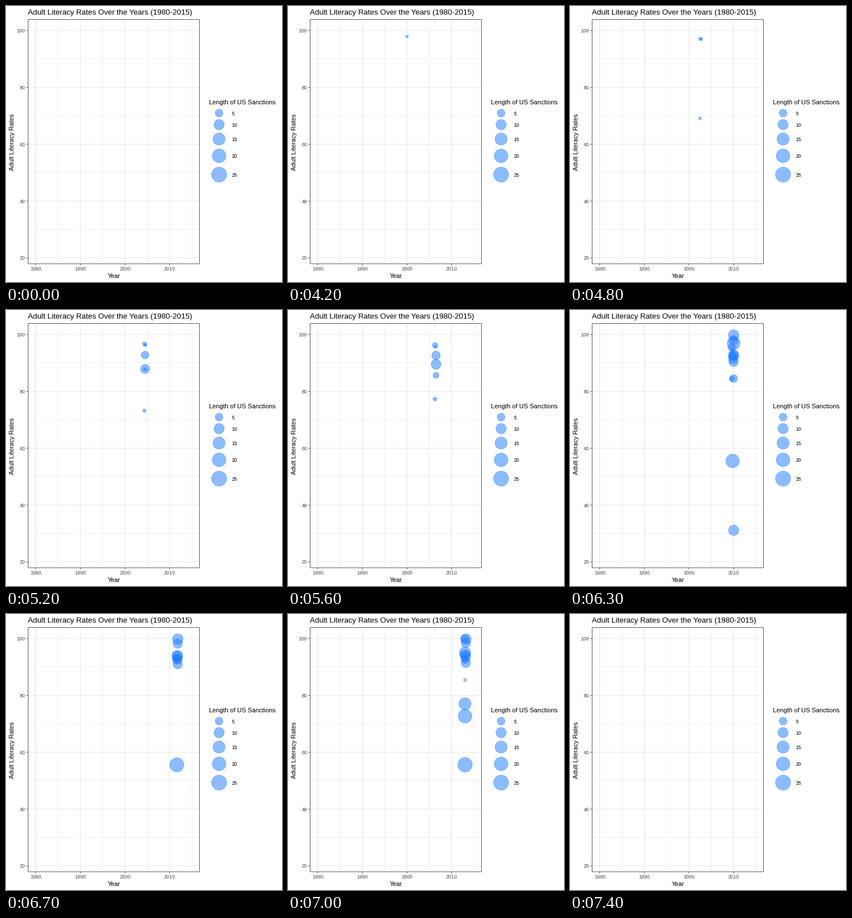
A matplotlib script for the animation above (7.5 s loop, 480x480 px).

```python
import numpy as np
import matplotlib.pyplot as plt
from matplotlib.animation import FuncAnimation
from matplotlib.patches import Circle, Rectangle

SIZE, DPI = 480, 72
FRAMES, INTERVAL = 75, 100
FIRST_YEAR, LAST_YEAR = 1980, 2015
BLUE = (0.106, 0.478, 1.0, 0.5)
GRID, DARK, LABEL = "#e6e6e6", "#333333", "#4d4d4d"

# Each bubble: (year, literacy rate, sanction length) at its known years.
TRACKS = [
    [(2000, 97.9, 1), (2011, 94.1, 1)],
    [(2002, 68.1, 1), (2011, 87.5, 2)],
    [(2002, 97.2, 1), (2011, 95.1, 6)],
    [(2004, 92.8, 4.5), (2010, 92.5, 10), (2013, 95, 13)],
    [(2004, 87.5, 7), (2008, 90.7, 10.5)],
    [(2004, 88.3, 1), (2008, 84, 5), (2010, 84.5, 5)],
    [(2005, 23.6, 7), (2006, 25, 8)],
    [(2007, 55.5, 17), (2013, 55.6, 23)],
    [(2008, 97.8, 17.5), (2010, 96.9, 17.5)],
    [(2007, 98, 4), (2010, 98, 8), (2015, 98.6, 8)],
    [(2008, 93.4, 13), (2010, 92.9, 9), (2013, 94.3, 9)],
    [(2008, 90.2, 7), (2015, 94.8, 11)],
    [(2007, 92.8, 4), (2013, 92.6, 5)],
    [(2008, 76.8, 7)],
    [(2010, 99.8, 10.5), (2015, 99.8, 11)],
    [(2010, 90.4, 8), (2015, 92, 8)],
    [(2010, 31.1, 10), (2011, 30.7, 11)],
    [(2013, 72.7, 20)],
    [(2013, 99.9, 5)],
    [(2013, 85.4, 1)],
    [(2013, 77, 15), (2015, 61.4, 17)],
]


def x_of(year):
    return 51.7 + 7.763 * (year - 1980)


def y_of(rate):
    return 42.6 + 4.944 * (100 - rate)


def radius(length):
    return 2.86 + 2.17 * np.sqrt(length - 1)


def frame_of(year):
    span = LAST_YEAR - FIRST_YEAR
    return round((FRAMES - 1) * (year - FIRST_YEAR) / span)


fig = plt.figure(figsize=(SIZE / DPI, SIZE / DPI), dpi=DPI, facecolor="white")
ax = fig.add_axes([0, 0, 1, 1])
ax.set_xlim(0, SIZE)
ax.set_ylim(SIZE, 0)
ax.axis("off")


def line(xs, ys, color, width):
    ax.plot(xs, ys, color=color, lw=width, zorder=1, snap=False,
            solid_capstyle="butt")


def text(x, y, label, size, color="black", **kw):
    kw = {"ha": "left", "va": "baseline", **kw}
    ax.text(x, y, label, fontsize=size, color=color, family="Liberation Sans", **kw)


def bubble(x, y, r):
    dot = Circle((x, y), r - 0.35, facecolor=BLUE, edgecolor=BLUE, lw=0.7, zorder=3)
    return ax.add_patch(dot)


LEFT, TOP, RIGHT, BOTTOM = 38.5, 23.5, 336.5, 448.2

for year in range(1980, 2020, 5):
    major = year % 10 == 0
    x = x_of(year)
    line([x, x], [TOP, BOTTOM], GRID, 1.0 if major else 0.6)
    if major:
        line([x, x], [BOTTOM, BOTTOM + 3], DARK, 0.8)
        text(x, 460, str(year), 8.8, LABEL, ha="center")

for rate in range(20, 101, 10):
    major = rate % 20 == 0
    y = y_of(rate)
    line([LEFT, RIGHT], [y, y], GRID, 1.0 if major else 0.6)
    if major:
        line([LEFT - 3, LEFT], [y, y], DARK, 0.8)
        text(33.3, y + 3.3, str(rate), 8.8, LABEL, ha="right")

ax.add_patch(Rectangle((LEFT, TOP), RIGHT - LEFT, BOTTOM - TOP, fill=False,
                       edgecolor=DARK, lw=0.8, zorder=4, snap=False))

text(38, 15, "Adult Literacy Rates Over the Years (1980-2015)", 13.2)
text(187.5, 473, "Year", 11, ha="center")
text(13.6, 236.5, "Adult Literacy Rates", 11, rotation=90,
     rotation_mode="anchor", ha="center")
text(353, 171, "Length of US Sanctions", 11)
for length, y in zip(range(5, 30, 5), (186.3, 206.3, 231.4, 260.6, 293.2)):
    bubble(370.6, y, radius(length))
    text(392.7, y + 3.9, str(length), 8.8)

bubbles = [bubble(0, 0, 1) for _ in TRACKS]


def update(frame):
    for dot, track in zip(bubbles, TRACKS):
        years, rates, lengths = map(np.array, zip(*track))
        keys = [frame_of(year) for year in years]
        dot.set_visible(keys[0] <= frame <= keys[-1] and frame < FRAMES - 1)
        dot.center = (np.interp(frame, keys, x_of(years)),
                      np.interp(frame, keys, y_of(rates)))
        dot.set_radius(np.interp(frame, keys, radius(lengths)) - 0.35)
    return bubbles


anim = FuncAnimation(fig, update, frames=FRAMES, interval=INTERVAL,
                     init_func=lambda: update(0), repeat=True, repeat_delay=0)
plt.show()
```
